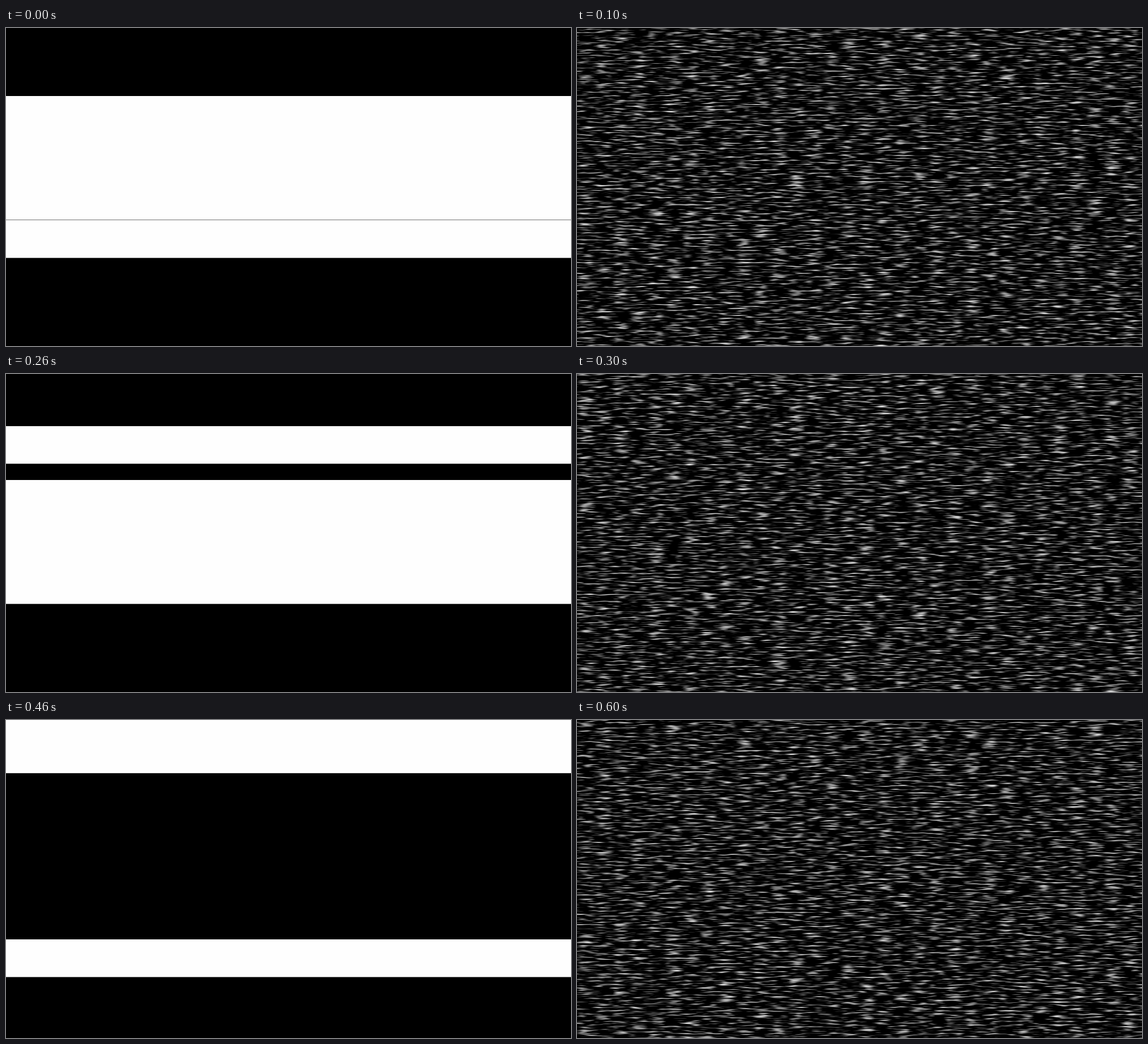
Write an HTML page with a canvas that moves like this. It is 998 px wide and 561 px high and loops after 700 ms.

```html
<!DOCTYPE html>
<html lang="en">
<head>
<meta charset="utf-8">
<title>Static and bars</title>
<style>
html, body { margin: 0; width: 100%; height: 100%; overflow: hidden; background: #000; }
canvas { display: block; width: 998px; height: 561px; }
</style>
</head>
<body>
<canvas id="stage" width="998" height="561"></canvas>
<script>
const W = 998, H = 561, STEP = 100;
const ctx = document.getElementById('stage').getContext('2d');

function seeded(s) {
  return () => {
    s = (s + 0x6D2B79F5) | 0;
    let t = Math.imul(s ^ (s >>> 15), 1 | s);
    t = (t + Math.imul(t ^ (t >>> 7), 61 | t)) ^ t;
    return ((t ^ (t >>> 14)) >>> 0) / 4294967296;
  };
}

const fade = t => t * t * t * (t * (t * 6 - 15) + 10);

// Gradient noise on a lattice of wide, flat cells
function layer(cw, ch, seed) {
  const rnd = seeded(seed);
  const cols = Math.ceil(W / cw) + 2, rows = Math.ceil(H / ch) + 2;
  const gx = new Float32Array(cols * rows), gy = new Float32Array(cols * rows);
  for (let i = 0; i < gx.length; i++) {
    const a = rnd() * Math.PI * 2;
    gx[i] = Math.cos(a);
    gy[i] = Math.sin(a);
  }
  return (px, py) => {
    const x = px / cw, y = py / ch;
    const c = Math.floor(x), r = Math.floor(y);
    const u = x - c, v = y - r, i = r * cols + c, j = i + cols;
    const s = fade(u);
    const a = gx[i] * u + gy[i] * v;
    const b = gx[i + 1] * (u - 1) + gy[i + 1] * v;
    const d = gx[j] * u + gy[j] * (v - 1);
    const e = gx[j + 1] * (u - 1) + gy[j + 1] * (v - 1);
    const top = a + (b - a) * s, low = d + (e - d) * s;
    return top + (low - top) * fade(v);
  };
}

function streaks(seed) {
  const cv = document.createElement('canvas');
  cv.width = W;
  cv.height = H;
  const c = cv.getContext('2d'), img = c.createImageData(W, H);
  const coarse = layer(31, 3.1, seed), fine = layer(15.5, 1.55, seed + 99);
  for (let y = 0, k = 0; y < H; y++) {
    for (let x = 0; x < W; x++, k += 4) {
      const n = coarse(x, y + 0.4) + 0.5 * fine(x, y + 0.4);
      const g = Math.min(225, Math.max(0, n * 340));
      img.data[k] = img.data[k + 1] = img.data[k + 2] = g;
      img.data[k + 3] = 255;
    }
  }
  c.putImageData(img, 0, 0);
  return () => ctx.drawImage(cv, 0, 0);
}

// Each bar is [top, bottom]
function bars(...list) {
  return () => {
    ctx.fillStyle = '#000';
    ctx.fillRect(0, 0, W, H);
    ctx.fillStyle = '#fefefe';
    for (const [top, bottom] of list) ctx.fillRect(0, top, W, bottom - top);
  };
}

const scenes = [
  bars([120, 338.45], [339, 405.6]),
  streaks(11),
  bars([92, 158.3], [187, 405.6]),
  streaks(23),
  bars([0, 93.8], [387, 453.5]),
  bars([411.5, 478]),
  streaks(47)
];

let shown = -1;
const start = performance.now();
function draw(now) {
  const t = Math.max(0, now - start);
  const i = Math.floor(t / STEP) % scenes.length;
  if (i !== shown) scenes[shown = i]();
  requestAnimationFrame(draw);
}
draw(start);
</script>
</body>
</html>
```
